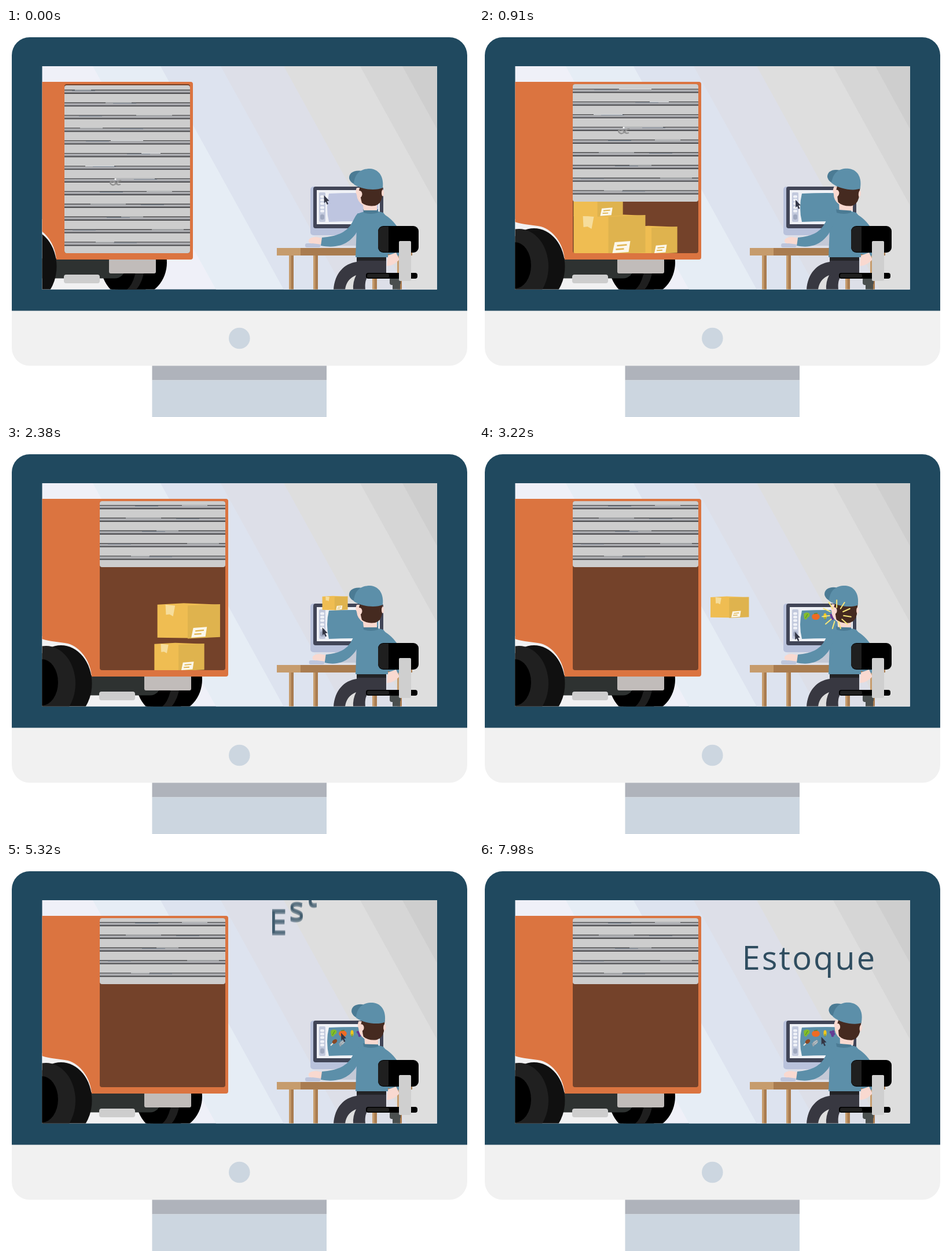
Write an HTML page with a canvas that moves like this. It is 807 px wide and 672 px high and loops after 8000 ms.

```html
<!DOCTYPE html>
<html lang="pt">
<head>
<meta charset="utf-8">
<title>Estoque</title>
<style>
html, body { margin: 0; width: 100%; height: 100%; overflow: hidden; background: #fff; }
canvas { display: block; }
</style>
</head>
<body>
<canvas id="stage" width="807" height="672"></canvas>
<script>
const ctx = document.getElementById('stage').getContext('2d');
const LOOP = 8000, STEP = 70;
const BLUE = '#5c8fa9', BLUE_DARK = '#4b7b94', SKIN = '#f9d9d0', WOOD = '#c69c6d', WOOD_DARK = '#a97c50';

const clamp = v => Math.max(0, Math.min(1, v));
const lerp = (a, b, p) => a + (b - a) * p;

// Linear keyframes given as [time, value] pairs.
function keys(t, list) {
  for (let i = 1; i < list.length; i++) {
    const [t0, a] = list[i - 1], [t1, b] = list[i];
    if (t <= t1) return lerp(a, b, clamp((t - t0) / (t1 - t0)));
  }
  return list[list.length - 1][1];
}

function rect(color, x, y, w, h, r = 0) {
  ctx.fillStyle = color;
  ctx.beginPath();
  ctx.roundRect(x, y, w, h, r);
  ctx.fill();
}

function oval(color, x, y, rx, ry = rx, turn = 0) {
  ctx.fillStyle = color;
  ctx.beginPath();
  ctx.ellipse(x, y, rx, ry, turn, 0, Math.PI * 2);
  ctx.fill();
}

function shape(color, d) {
  ctx.fillStyle = color;
  ctx.fill(new Path2D(d));
}

function line(color, width, d) {
  ctx.strokeStyle = color;
  ctx.lineWidth = width;
  ctx.stroke(new Path2D(d));
}

function group(draw, x = 0, y = 0) {
  ctx.save();
  ctx.translate(x, y);
  draw();
  ctx.restore();
}

function frame() {
  rect('#20495f', 10, 16, 787, 473, [31, 31, 0, 0]);
  rect('#f1f1f1', 10, 488.5, 787, 95, [0, 0, 31, 31]);
  oval('#ccd6e0', 403.3, 536, 18.3);
  rect('#afb3bb', 252.5, 583.5, 301.5, 25);
  rect('#ccd6e0', 252.5, 608.5, 301.5, 64);
}

function backdrop() {
  rect('#eff0f8', 62, 66, 683, 386);
  const bands = [[150, '#e6edf5'], [267, '#dde3ef'], [371, '#dddfe8'],
                 [480, '#dedede'], [612, '#d6d6d6'], [685, '#cecece']];
  for (const [x, color] of bands) shape(color, `M${x} 66 H1000 V452 H${x + 213} Z`);
}

// A parcel drawn around its centre, w wide.
function parcel(x, y, w) {
  group(() => {
    ctx.scale(w / 125, w / 125);
    shape('#efbd52', 'M-62 -32 L-10 -35 L62 -32 L0 34 L-62 33 Z');
    shape('#dfb34e', 'M-2 -30 L62 -33 V32 L-2 35 Z');
    shape('#f6dd9c', 'M-46 -32 L-27 -30 L-31 -9 L-38 -13 L-45 -12 Z');
    shape('#fbf7ea', 'M9 14 L36 12 L33 31 L5 33 Z');
    line('#dfb34e', 2.6, 'M13 20 L30 18.5 M11 26.5 L25 25.5');
  }, x, y);
}

const parcels = [
  { x: 299.5, y: 366, w: 87, start: 2800 },
  { x: 225.5, y: 356, w: 125, start: 2150 },
  { x: 206, y: 302, w: 86, start: 1500 }
];
const FLIGHT = 1000, TARGET = { x: 618, y: 293 };

function shutter(lift) {
  group(() => {
    rect('#cdcdcd', 162, 99, 217, 290, 4);
    for (let i = 0; i < 13; i++) {
      const y = 107.5 + i * 21.9;
      rect('#4a4a4c', 162, y - 1, 217, 1.5);
      rect('#b1b2b6', 162, y + 0.5, 217, 2.6);
      rect('#8b8c91', 162, y + 3.1, 217, 1.4);
      rect('#434346', 162, y + 4.5, 217, 1.7);
      // worn glints along the slats
      rect('#dadde0', 180 + i * 53 % 150, y - 1, 28 + i * 17 % 40, 1);
      rect('#6f7d8c', 175 + i * 71 % 130, y + 0.4, 40, 0.8);
    }
    line('#939393', 2.4, 'M260 264 C254 262 251 273 245 271 C239 269 241 264 246 265 C252 266 251 273 259 270');
    oval('#fff', 250, 261, 1.6);
  }, 0, -lift);
}

function truck(t) {
  const dx = -61 * (1 - clamp(t / 600)) ** 2;
  const open = clamp((t - 405) / 1010);
  const lift = 178 * (1 - Math.cos(Math.PI * open)) / 2;
  group(() => {
    // rear wheel and chassis
    rect('#f1f1f2', 0, 330, 240, 122);
    oval('#000', 286, 405, 53, 58);
    oval('#000', 272, 405, 48, 60);
    oval('#1f1f1f', 268, 405, 33, 56);
    oval('#000', 257, 408, 29, 49);
    rect('#2e3231', 100, 398, 167, 34.5, [0, 0, 18, 0]);
    rect('#c1bcba', 239, 398, 81, 26, 3);
    rect('#cdcdcd', 161, 426, 62, 15, 4);
    // body with wheel arch
    shape('#db7440', 'M0 93 H380 Q384 93 384 97 V396 Q384 400 380 400 H148 C146 372 128 349 107 343 C92 340 78 340 62 335 L0 330 Z');
    oval('#101010', 95, 412, 53.5, 66);
    oval('#202020', 69, 412, 51, 65);
    oval('#000', 62, 410, 28, 40);
    ctx.beginPath();
    ctx.roundRect(162, 97, 217, 292, 4);
    ctx.clip();
    rect('#74422a', 162, 97, 217, 292);
    for (const p of parcels) if (t < p.start) parcel(p.x, p.y, p.w);
    shutter(lift);
  }, dx);
}

function groceries(t) {
  const landed = parcels.filter(p => t >= p.start + FLIGHT).length;
  if (landed > 0) {
    shape('#83bd2c', 'M561 292 Q566 287 571 291 Q573 296 568 298 L565 302 L562 300 Z');
    line('#4d8a22', 1, 'M564 299 L568 292');
    oval('#ee6b24', 582, 296.5, 6.8, 5.5);
    line('#5f8c27', 1.6, 'M579 291.5 L585 290.5');
  }
  if (landed > 1) {
    oval('#f2c81c', 598, 295.5, 2.6, 5);
    line('#7b9a2a', 1.6, 'M598 297 V302');
    for (const [x, y] of [[608, 294], [612, 293], [610, 297], [613, 297], [611, 300]]) oval('#653b93', x, y, 2.3);
  }
  if (landed > 2) {
    line('#f0e6d8', 2, 'M561 317 L566 312');
    oval('#8b4824', 568, 310, 4.6, 3.2, -0.7);
    oval('#9aa5ad', 581, 312, 5.8, 3.2, -0.7);
    shape('#9aa5ad', 'M578 314 L575 313 L577 319 L580 317 Z');
    line('#d1d8dc', 1, 'M578 313 L584 308 M580 315 L585 311');
  }
}

function computer(t) {
  rect('#c4c9d6', 569, 356, 37, 20);
  rect('#b9c2dc', 526, 274, 126, 84, 5);
  rect('#414557', 531, 274, 121, 72, 4);
  rect('#eff1f6', 537, 280, 109, 59);
  rect('#c2c9dd', 541, 284, 11, 51, 2);
  for (const y of [291, 297, 303, 310, 316]) rect('#f0f2f8', 543, y - 2, 7, 4.4, 2);
  rect('#9fa8bf', 543, 322, 7, 9, 3);
  shape(t < 910 ? '#bec5e0' : BLUE, 'M558 286 Q600 284 642 286 Q645 310 642 335 Q600 333 558 335 Q552 310 558 286 Z');
  groceries(t);
  const x = keys(t, [[0, 549.5], [630, 546.5], [1260, 547.5], [3220, 546], [4200, 546], [5320, 579], [6580, 607.5], [7980, 591.5]]);
  const y = keys(t, [[0, 289], [630, 290], [1260, 305], [3220, 323], [4200, 323], [5320, 295], [6580, 305], [7980, 302]]);
  group(() => shape('#343746', 'M0 0 L9 9.5 L5.2 10 L7.5 15 L5.2 16 L3 11 L0.3 13.5 Z'), x, y);
}

function desk() {
  for (const x of [489, 531, 633, 676]) {
    rect(WOOD, x, 392, 4, 60);
    rect(WOOD_DARK, x + 3.5, 392, 4.5, 60);
  }
  rect(WOOD_DARK, 468, 380, 234, 13);
  rect(WOOD, 468, 380, 41, 13);
}

function head(t) {
  const sway = keys(t, [[0, 0], [1260, 12], [1500, 12], [2450, -1], [3220, 4], [3900, 10], [4700, 9], [5320, 4], [6580, -2], [7980, 11]]);
  ctx.save();
  ctx.translate(632 + sway * 0.5, 318);
  ctx.rotate(sway * 0.009);
  ctx.translate(-632, -318);
  shape(SKIN, 'M606 276 H650 Q654 284 650 290 L641 302 V315 H618 L617 306 Q607 300 606 288 Q603 283 606 276 Z');
  shape('#452a20', 'M612 272 H651 L650 292 Q648 304 638 307 Q623 309 615 302 Q612 292 613 286 L610 281 Z');
  oval(SKIN, 611, 287, 4.5, 6);
  oval(SKIN, 651, 285, 2, 5.5);
  shape(BLUE_DARK, 'M614 247 C601 245 592 251 593 260 C595 267 601 270 607 271 Z');
  shape(BLUE, 'M601 270 C602 251 613 243 629 243 C646 244 653 259 651 276 C640 281 616 280 601 270 Z');
  ctx.restore();
}

function worker(t) {
  const h = keys(t, [[0, 0], [630, 2], [1260, 9], [3220, 5], [4200, 5], [5320, 0], [6580, 4], [7980, 4]]);
  // legs
  shape('#383841', 'M606 400 H657 V426 H628 Q619 434 621 452 H566 C568 424 584 407 606 404 Z');
  shape('#dedede', 'M586 452 Q588 434 605 427 Q599 439 600 452 Z');
  // far arm and torso
  shape(BLUE, 'M650 320 C668 329 684 350 690 372 L676 398 L660 390 Z');
  shape(SKIN, 'M660 393 L674 388 L680 400 Q668 412 658 411 Z');
  shape(BLUE, 'M607 321 Q630 311 652 319 Q664 330 660 396 H604 Z');
  rect('#232326', 606, 396, 51, 6);
  // mouse arm
  rect('#bdc5dc', 517 + h, 372, 26.5, 7, 3);
  shape(SKIN, `M${523 + h} 366 Q${526 + h} 361 ${536 + h} 361 L${547 + h} 363 L${545 + h} 374 L${530 + h} 372 Q${522 + h} 373 ${523 + h} 366 Z`);
  shape(BLUE, `M608 320 C596 332 600 358 ${546 + h} 362 L${544 + h} 376 C580 383 598 367 607 351 L618 326 Z`);
  shape(BLUE_DARK, 'M617 313 Q630 317 643 313 V319 Q630 323 618 319 Z');
  head(t);
}

function chair() {
  rect('#4a4f4f', 663, 431, 19, 13, 4);
  rect('#4a4f4f', 668, 438, 13, 14);
  rect('#000', 622, 423, 89, 10, 4);
  rect('#202020', 624, 424.5, 38, 7, 3);
  rect('#000', 643, 342, 70, 46, 9);
  rect('#1f1f1f', 643, 343, 18, 44, [9, 0, 0, 9]);
  rect('#cfcfcf', 679, 368, 21, 69, 2);
}

function flyers(t) {
  for (const b of parcels) {
    const p = (t - b.start) / FLIGHT;
    if (p >= 0 && p < 1) {
      const y = lerp(b.y, TARGET.y, p) - 57 * Math.sin(Math.PI * p);
      parcel(lerp(b.x, TARGET.x, p), y, b.w * (1 - 0.55 * p));
    }
    const age = t - b.start - FLIGHT;
    if (age >= 0 && age < 350) burst(age / 350);
  }
}

function burst(p) {
  const inner = 9 + 16 * p, outer = 24 + 5 * p;
  group(() => {
    ctx.lineCap = 'round';
    for (let i = 0; i < 11; i++) {
      const a = i * Math.PI * 2 / 11 + 0.15, c = Math.cos(a), s = Math.sin(a);
      line('#f8e777', 2, `M${c * inner} ${s * inner} L${c * outer} ${s * outer}`);
    }
  }, TARGET.x, TARGET.y);
}

function title(t) {
  ctx.font = '56px "Open Sans", "Noto Sans", sans-serif';
  ctx.fillStyle = '#2f4d60';
  let x = 454.5;
  [...'Estoque'].forEach((letter, i) => {
    const p = clamp((t - 5080 - i * 85) / 546);
    const y = 185.5 - 130 * (1 - p) ** 1.3;
    if (p === 1) ctx.fillText(letter, x, y);
    else if (p > 0) {
      // soft trail while falling
      ctx.globalAlpha = 0.36;
      for (let k = -2; k <= 2; k++) ctx.fillText(letter, x, y + k * 1.3);
      ctx.globalAlpha = 1;
    }
    x += ctx.measureText(letter).width + 3;
  });
}

function draw(t) {
  ctx.clearRect(0, 0, 807, 672);
  frame();
  ctx.save();
  ctx.beginPath();
  ctx.rect(62.5, 66, 682, 385.5);
  ctx.clip();
  backdrop();
  truck(t);
  computer(t);
  desk();
  worker(t);
  chair();
  flyers(t);
  title(t);
  ctx.restore();
}

const begin = performance.now();
function tick() {
  const t = (performance.now() - begin) % LOOP;
  draw(t - t % STEP);
  requestAnimationFrame(tick);
}
tick();
</script>
</body>
</html>
```
